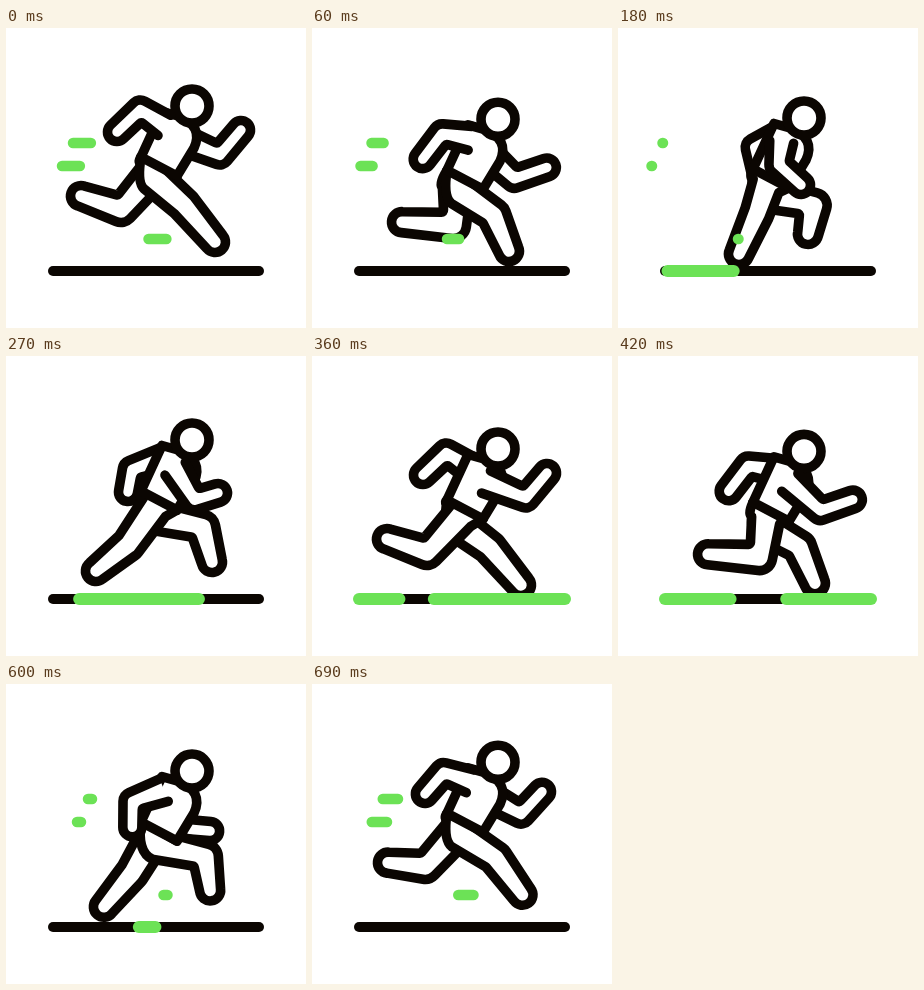
An HTML page with a canvas that plays this animation: 300 px wide and 300 px high, repeating every 0.72 s.

```html
<!DOCTYPE html>
<html lang="en">
<head>
<meta charset="utf-8">
<title>Runner</title>
<style>
  html, body { margin: 0; width: 100%; height: 100%; overflow: hidden; background: #fff; }
  canvas { display: block; width: 300px; height: 300px; }
</style>
</head>
<body>
<canvas id="stage"></canvas>
<script>
const LOOP = 720, STEP = 30, HALF = LOOP / 2;
const INK = '#0b0602', GREEN = '#6ce256', LINE = 9.6;

const canvas = document.getElementById('stage');
const ctx = canvas.getContext('2d');
const dpr = window.devicePixelRatio || 1;
canvas.width = canvas.height = 300 * dpr;
ctx.scale(dpr, dpr);
ctx.lineCap = ctx.lineJoin = 'round';

const clamp01 = x => Math.max(0, Math.min(1, x));
const span = (t, from, to) => clamp01((t - from) / (to - from));
const mix = (a, b, u) => a + (b - a) * u;
const easeIn = u => u * u;
const easeOut = u => 1 - (1 - u) * (1 - u);

// Closed smooth curve through evenly timed poses.
function cycle(poses) {
  const n = poses.length;
  return t => {
    const x = (t % LOOP) / LOOP * n, i = Math.floor(x), u = x - i;
    const [a, b, c, d] = [n - 1, 0, 1, 2].map(k => poses[(i + k) % n]);
    return b.map((p, k) => p + u / 2 * (c[k] - a[k]
      + u * (2 * a[k] - 5 * p + 4 * c[k] - d[k] + u * (3 * (p - c[k]) + d[k] - a[k]))));
  };
}

// One stride: joint x, y and tip x, y. The other side runs half a loop later.
const legPose = cycle([
  [178, 177, 209, 214], [180, 172, 185, 208], [139, 173, 121, 214], [122, 183, 90, 209],
  [115, 182, 75, 168], [158, 184, 106, 189], [197, 165, 190, 194], [197, 165, 206, 200]]);
const armPose = cycle([
  [134, 82, 111, 104], [131, 101, 118, 127], [161, 125, 183, 145], [189, 138, 212, 131],
  [214, 127, 235, 102], [191, 139, 225, 138], [137, 108, 144, 138], [126, 108, 122, 130]]);
const bob = cycle([0, 18.5, 12, 6, 15, 17.5, 14, 6.5].map(y => [y]));

const waistBack = [135, 129], waistFront = [171, 148];

function paint() {
  ctx.fillStyle = '#fff';
  ctx.strokeStyle = INK;
  ctx.lineWidth = LINE;
  ctx.fill();
  ctx.stroke();
}

function unit(a, b) {
  const x = b[0] - a[0], y = b[1] - a[1], len = Math.hypot(x, y) || 1;
  return { x: x / len, y: y / len, len };
}

// Two-part tube, open at its root and round at its tip.
function tube(root, joint, tip, rBack, rFront, rJoint, rTip, isLeg) {
  const d = unit(root, joint), e = unit(joint, tip);
  const bx = -d.y - e.y, by = d.x + e.x, bl = Math.hypot(bx, by) || 1;
  const turn = d.x * e.y - d.y * e.x;
  const side = s => {
    const outer = turn * s < 0;
    const m = s * rJoint * Math.min(2 / bl, outer ? 1.9 : 1.7);
    const r = s > 0 ? rBack : rFront;
    return {
      start: [root[0] - d.y * r * s, root[1] + d.x * r * s],
      mid: [joint[0] + bx / bl * m, joint[1] + by / bl * m],
      end: [tip[0] - e.y * rTip * s, tip[1] + e.x * rTip * s],
      round: outer ? Math.min(rJoint, d.len * .5, e.len * .5) : 2
    };
  };
  const a = side(1), b = side(-1), ang = Math.atan2(e.y, e.x);

  ctx.beginPath();
  if (isLeg) {
    ctx.moveTo(...waistBack);
    ctx.quadraticCurveTo(Math.min(waistBack[0], a.start[0]) - 4,
      mix(waistBack[1], a.start[1], .8), ...a.start);
  } else ctx.moveTo(...a.start);
  ctx.arcTo(...a.mid, ...a.end, a.round);
  ctx.lineTo(...a.end);
  ctx.arc(tip[0], tip[1], rTip, ang + Math.PI / 2, ang - Math.PI / 2, true);
  ctx.arcTo(...b.mid, ...b.start, b.round);
  ctx.lineTo(...b.start);
  if (isLeg) ctx.lineTo(...waistFront);
  paint();
}

function leg(t, hip) {
  const [jx, jy, tx, ty] = legPose(t);
  tube(hip, [jx, jy], [tx, ty], 19, 10, 13, 10.5, true);
}

function arm(t) {
  const [jx, jy, tx, ty] = armPose(t);
  const reach = span(jx, 132, 214);
  tube([mix(158, 174, reach), mix(97, 111, reach)], [jx, jy], [tx, ty], 12, 12, 9.7, 9.5, false);
}

function torso() {
  ctx.beginPath();
  ctx.moveTo(156, 83.5);
  ctx.lineTo(172, 88);
  ctx.quadraticCurveTo(198, 98, 188, 120);
  ctx.lineTo(...waistFront);
  ctx.lineTo(...waistBack);
  ctx.closePath();
  paint();
}

function head() {
  ctx.beginPath();
  ctx.arc(186, 78, 17, 0, 7);
  paint();
}

function bar(x0, x1, y, width, color) {
  ctx.beginPath();
  ctx.moveTo(x0, y);
  ctx.lineTo(x1 + .01, y);
  ctx.lineWidth = width;
  ctx.strokeStyle = color;
  ctx.stroke();
}

function runner(t) {
  ctx.save();
  ctx.translate(0, bob(t)[0]);
  arm(t + HALF);
  leg(t + HALF, [149, 150]);
  leg(t, [152, 148]);
  torso();
  head();
  arm(t);
  ctx.restore();
}

function ground(t) {
  const streak = (from, to) => {
    if (to - from > .5) bar(from, to, 243, 12, GREEN);
  };
  bar(47, 253, 243, 10, INK);
  streak(mix(47, 253, easeIn(span(t, 140, 505))), mix(47, 253, span(t, 100, 340)));
  streak(mix(47, 150, span(t, 475, 625)), mix(47, 150, easeOut(span(t, 285, 625))));
}

// Speed dashes cross the loop point, so early times count as late ones.
function dashes(t) {
  const s = t < 540 ? t + LOOP : t;
  if (s <= 555 || s > 905) return;
  const x0 = 82 - (s - 600) / 8;
  const x1 = Math.max(x0, mix(86, 45, span(s, 715, 900)));
  for (const [dx, y] of [[0, 115], [-11, 138], [75.5, 211]]) bar(x0 + dx, x1 + dx, y, 10.5, GREEN);
}

function draw(t) {
  ctx.fillStyle = '#fff';
  ctx.fillRect(0, 0, 300, 300);
  runner(t);
  ground(t);
  dashes(t);
}

const start = performance.now();
function tick() {
  const t = Math.max(0, performance.now() - start) % LOOP;
  draw(Math.floor(t / STEP) * STEP);
  requestAnimationFrame(tick);
}
tick();
</script>
</body>
</html>
```
